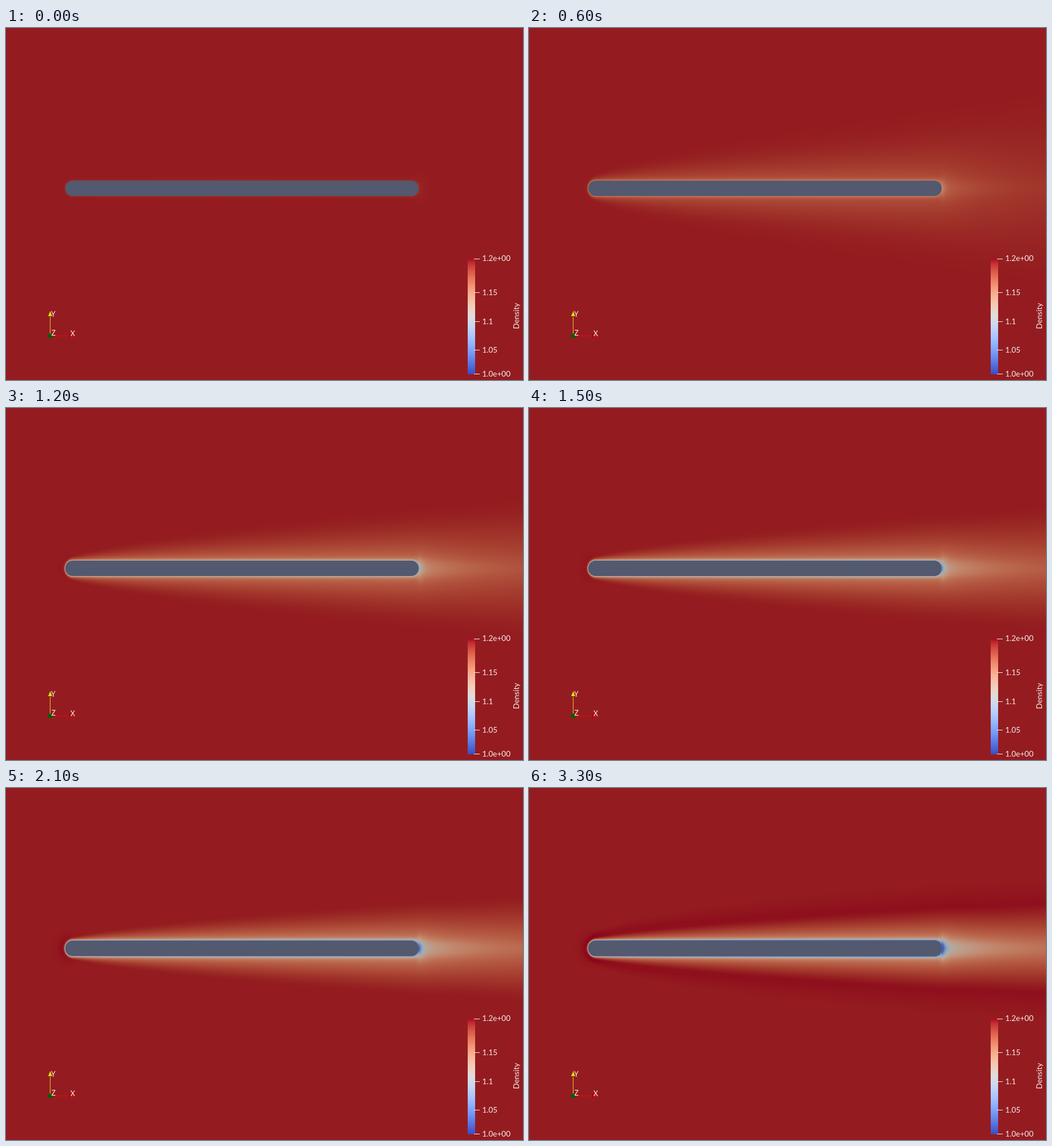
Write an HTML page with a canvas that moves like this. It is 907 px wide and 618 px high and loops after 3.6 s.

```html
<!DOCTYPE html>
<html lang="en">
<head>
<meta charset="utf-8">
<title>Density around a flat plate</title>
<style>
  html, body { margin: 0; width: 100%; height: 100%; overflow: hidden; background: #941c20; }
  canvas, svg { position: absolute; left: 0; top: 0; width: 907px; height: 618px; display: block; }
  text { font: 13.5px Lato, sans-serif; fill: #f4eeee; }
  .axis { font-size: 12.5px; }
</style>
</head>
<body>
<canvas id="stage" width="907" height="618"></canvas>
<svg viewBox="0 0 907 618">
  <text x="835.5" y="409">1.2e+00</text>
  <text x="835.5" y="469">1.15</text>
  <text x="835.5" y="519.5">1.1</text>
  <text x="835.5" y="569.5">1.05</text>
  <text x="835.5" y="612">1.0e+00</text>
  <text transform="translate(899.5 528.5) rotate(-90)">Density</text>
  <text class="axis" x="79" y="507">Y</text>
  <text class="axis" x="79.5" y="540">Z</text>
  <text class="axis" x="113" y="541">X</text>
</svg>
<script>
const WIDTH = 907, HEIGHT = 618, STEP = 300, STEPS = 12;
const plate = { left: 104, right: 724, mid: 281.5, half: 13.5, radius: 13 };
const background = [148, 28, 32];
const BASE = 0.028, SHADE = 0.78, LEVELS = 2048;
const ctx = document.getElementById('stage').getContext('2d');

const clamp = v => Math.max(0, Math.min(1, v));

// Diverging red-white-blue map, interpolated in polar Lab; 0 is red.
function coolWarm(v) {
  const pull = Math.abs(1 - 2 * v);
  const m = 88 - 8 * pull, sat = 1.08 * pull;
  const hue = v < 0.5 ? 1.061 - 0.561 * pull : -1.661 + 0.561 * pull;
  const fy = (m * Math.cos(sat) + 16) / 116;
  const fx = fy + m * Math.sin(sat) * Math.cos(hue) / 500;
  const fz = fy - m * Math.sin(sat) * Math.sin(hue) / 200;
  const cube = f => f > 6 / 29 ? f ** 3 : (f - 4 / 29) * 108 / 841;
  const x = 0.9505 * cube(fx), y = cube(fy), z = 1.089 * cube(fz);
  return [
    3.2406 * x - 1.5372 * y - 0.4986 * z,
    -0.9689 * x + 1.8758 * y + 0.0415 * z,
    0.0557 * x - 0.204 * y + 1.057 * z
  ].map(c => 255 * clamp(c > 0.0031308 ? 1.055 * c ** (1 / 2.4) - 0.055 : 12.92 * c));
}

// The flow surface is a shaded copy of the map, tinted to meet the background.
const tint = coolWarm(BASE).map((c, i) => background[i] - SHADE * c);
const palette = Array.from({ length: LEVELS + 1 }, (_, i) =>
  coolWarm(i / LEVELS).map((c, j) => SHADE * c + tint[j]));

function plateDistance(x, y) {
  const half = (plate.right - plate.left) / 2;
  const dx = Math.abs(x - plate.left - half) - half + plate.radius;
  const dy = y - plate.half + plate.radius;
  return Math.hypot(Math.max(dx, 0), Math.max(dy, 0)) + Math.min(Math.max(dx, dy), 0) - plate.radius;
}

// The flow relaxes towards its steady state.
function flowAt(step) {
  const grown = 1 - Math.exp(-step / 4), heat = grown ** 2;
  return {
    layer: 0.3 * grown,
    power: 3.4 - 2 * grown,
    width: 50 + 150 * Math.exp(-step / 3),
    wall: 0.03 + 0.75 * heat,
    core: 0.28 * heat,
    decay: 20 + 600 * heat,
    nose: 0.06 * clamp((step - 3) / 5),
    outer: 0.016 * clamp((step - 7) / 4)
  };
}

function renderField(step) {
  const flow = flowAt(step);
  const image = ctx.createImageData(WIDTH, HEIGHT), px = image.data;
  for (let col = 0; col < WIDTH; col++) {
    const x = col + 0.5;
    const run = Math.max(0, x - 100), behind = x - plate.right;
    const wake = Math.max(0, behind), ease = (behind + Math.hypot(behind, 30)) / 2;
    const width = Math.max(1, flow.width * (run / 550) ** 0.65);
    const shell = Math.max(1, 4.2 * Math.sqrt(run));
    const fade = 1 / (1 + ease / flow.decay);
    const body = Math.exp(-wake * wake / (wake + 20) / 40), round = 10 * (1 - body);
    const wallScale = 1.2 + 1.3 * Math.sqrt(Math.min(1, run / 600)) + 3 * clamp((x - 716) / 10);
    const power = 1 + (flow.power - 1) * fade;
    const reach = plate.half + Math.max(width + round, shell, 35);
    for (let row = 0; row < HEIGHT; row++) {
      const y = Math.abs(row + 0.5 - plate.mid);
      let d = BASE;
      if (y < reach) {
        const s = Math.max(0, plateDistance(x, y));
        const side = Math.max(0, Math.hypot(y, round) - round - plate.half * body);
        const off = x < plate.left + plate.radius ? s : side;
        d += flow.layer * fade * Math.max(0, 1 - off / width) ** power;
        d += flow.wall * Math.exp(-s / wallScale);
        if (wake > 0) d += flow.core * Math.exp(-wake / 60 - (y / 14) ** 2);
        d -= flow.nose * Math.exp(-s / 8 - Math.max(0, x - plate.left) / 25);
        d -= flow.outer * clamp(2.5 * (1 - off / shell));
      }
      const c = palette[Math.round(Math.min(0.88, clamp(d)) * LEVELS)], p = (row * WIDTH + col) * 4;
      px[p] = c[0]; px[p + 1] = c[1]; px[p + 2] = c[2]; px[p + 3] = 255;
    }
  }
  return image;
}

function box(color, x, y, w, h) {
  ctx.fillStyle = color;
  ctx.fillRect(x, y, w, h);
}

function shape(color, points) {
  ctx.fillStyle = color;
  ctx.beginPath();
  points.forEach(([x, y]) => ctx.lineTo(x, y));
  ctx.fill();
}

function drawPlate() {
  ctx.fillStyle = '#53596e';
  ctx.beginPath();
  ctx.roundRect(plate.left, plate.mid - plate.half, plate.right - plate.left, plate.half * 2, plate.radius);
  ctx.fill();
}

function drawLegend() {
  const ramp = ctx.createLinearGradient(0, 405, 0, 608);
  for (let i = 0; i <= 32; i++) ramp.addColorStop(i / 32, `rgb(${coolWarm(i / 32).map(Math.round)})`);
  box(ramp, 810, 405, 13, 203);
  [405, 464, 515, 565, 607].forEach(y => box('#f4eeee', 821, y, 10, 1));
}

function drawAxes() {
  box('#e2c83c', 77, 507, 1, 31);
  box('#ff0000', 80, 540, 32, 1);
  shape('#e0e000', [[77.5, 497], [81, 506], [74, 506]]);
  box('#3c3008', 75, 506, 5, 1);
  shape('#d80000', [[121, 540.5], [111, 537], [111, 544]]);
  box('#600408', 111, 538, 1, 5);
  ctx.fillStyle = '#006000';
  ctx.beginPath();
  ctx.arc(77.5, 540.5, 4, 0, Math.PI * 2);
  ctx.fill();
}

const fields = [];
let shown = -1;

function draw(step) {
  fields[step] ||= renderField(step);
  ctx.putImageData(fields[step], 0, 0);
  drawPlate();
  drawLegend();
  drawAxes();
}

const start = performance.now();
function tick() {
  const step = Math.floor((performance.now() - start) / STEP) % STEPS;
  if (step !== shown) draw(shown = step);
  requestAnimationFrame(tick);
}
tick();
</script>
</body>
</html>
```
